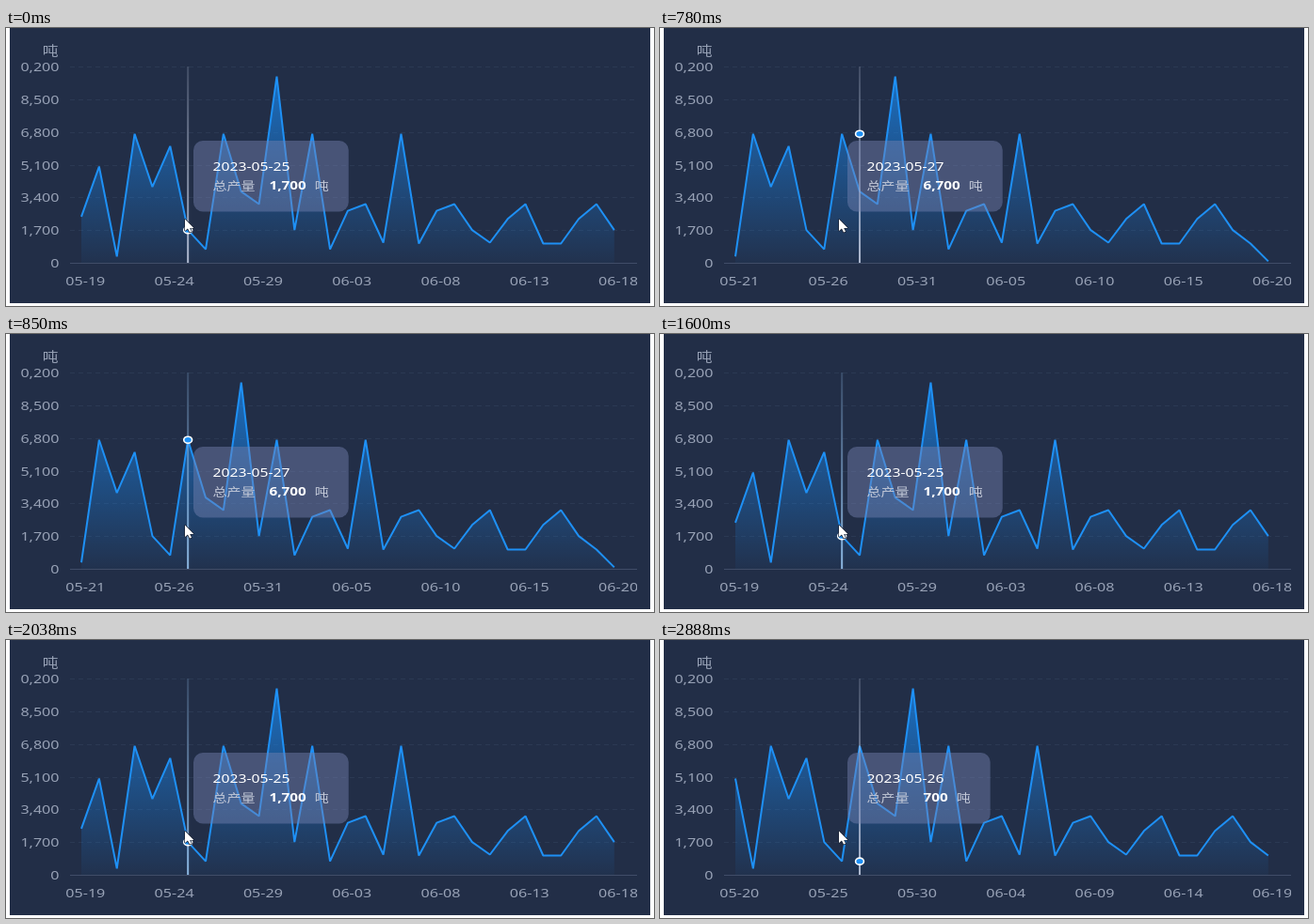
An HTML page with a canvas that plays this animation: 688x296 px, repeating every 3260 ms.

```html
<!DOCTYPE html>
<html lang="zh">
<head>
<meta charset="utf-8">
<title>总产量</title>
<style>
html, body { margin: 0; width: 100%; height: 100%; overflow: hidden; background: #fff; }
canvas { display: block; }
</style>
</head>
<body>
<canvas id="stage" width="688" height="296"></canvas>
<script>
const ctx = document.getElementById('stage').getContext('2d');

const FONT = '"Noto Sans", "Noto Sans CJK SC", "Noto Sans CJK", sans-serif';
const WIDE = 1.22; // the whole picture is wider than tall
const LEFT = 80, STEP = 18.86, BASE = 250, TOP = 41, MAX = 10200, COUNT = 31;
const LABEL = '#98a2b6';
const GREY = '190,200,222', BLUE = '150,196,240';

const data = [
  2400, 5000, 330, 6700, 3950, 6060, 1700, 700, 6700, 3700, 3050,
  9680, 1700, 6700, 700, 2700, 3050, 1050, 6700, 1000, 2700, 3050,
  1700, 1050, 2280, 3050, 1000, 1000, 2280, 3050, 1700, 1000, 80
];

// first day shown, slot of the pointer, day in the tooltip, pointer tone
const LOOP = 3260;
const steps = [
  { at: 0,    first: 0, slot: 6, day: 6, tone: GREY },
  { at: 660,  first: 1, slot: 7, day: 7, tone: GREY },
  { at: 780,  first: 2, slot: 7, day: 8, tone: GREY },
  { at: 850,  first: 2, slot: 6, day: 8, tone: BLUE },
  { at: 1600, first: 0, slot: 6, day: 6, tone: BLUE },
  { at: 2330, first: 1, slot: 7, day: 7, tone: GREY }
];

const px = slot => LEFT + slot * STEP;
const py = value => BASE - value / MAX * (BASE - TOP);
const dateOf = day => new Date(Date.UTC(2023, 4, 19 + day)).toISOString().slice(0, 10);

// Draws text and returns its width on the stage.
function text(str, x, y, { size = 13.2, color = LABEL, align = 'left', weight = 400 } = {}) {
  ctx.save();
  ctx.translate(x, y);
  ctx.scale(WIDE, 1);
  ctx.font = `${weight} ${size}px ${FONT}`;
  ctx.textAlign = align;
  ctx.fillStyle = color;
  ctx.fillText(str, 0, 0);
  const width = ctx.measureText(str).width * WIDE;
  ctx.restore();
  return width;
}

function fade(y0, y1, from, to) {
  const g = ctx.createLinearGradient(0, y0, 0, y1);
  g.addColorStop(0, from);
  g.addColorStop(1, to);
  return g;
}

function rule(y, color, dash) {
  ctx.setLineDash(dash);
  ctx.strokeStyle = color;
  ctx.lineWidth = 1;
  ctx.beginPath();
  ctx.moveTo(68, y);
  ctx.lineTo(670, y);
  ctx.stroke();
  ctx.setLineDash([]);
}

function drawAxes(first) {
  text('吨', 55.5, 29, { size: 13.8, align: 'right' });
  for (let v = 0; v <= MAX; v += 1700) {
    const y = Math.round(py(v));
    const name = v === MAX ? '0,200' : v.toLocaleString('en-US');
    text(name, 56.5, y + 4.5, { align: 'right' });
    if (v) rule(y + 0.5, '#2b3953', [5, 4]);
  }
  rule(BASE + 0.5, '#404d68', []);

  ctx.save();
  ctx.beginPath();
  ctx.rect(0, 255, 670, 35);
  ctx.clip();
  for (let i = 0; i < COUNT; i += 5) {
    text(dateOf(first + i).slice(5), px(i) + 4.3, 274, { align: 'center' });
  }
  ctx.restore();
}

function drawSeries(first) {
  const line = new Path2D();
  for (let i = 0; i < COUNT; i++) line.lineTo(px(i), py(data[first + i]));
  const area = new Path2D(line);
  area.lineTo(px(COUNT - 1), BASE);
  area.lineTo(px(0), BASE);
  area.closePath();
  ctx.fillStyle = fade(52, BASE, 'rgba(24,144,255,.66)', 'rgba(24,144,255,.04)');
  ctx.fill(area);
  ctx.strokeStyle = '#1e90f5';
  ctx.lineWidth = 2;
  ctx.lineJoin = 'bevel';
  ctx.stroke(line);
}

function drawPointer(x, y, tone) {
  ctx.fillStyle = fade(TOP, BASE, `rgba(${tone},.2)`, `rgba(${tone},.9)`);
  ctx.fillRect(x - 1, TOP, 2, BASE - TOP);
  ctx.beginPath();
  ctx.ellipse(x, y, 4.4, 3.5, 0, 0, 2 * Math.PI);
  ctx.fillStyle = '#1e90f5';
  ctx.fill();
  ctx.strokeStyle = '#fff';
  ctx.lineWidth = 1.6;
  ctx.stroke();
}

function drawTooltip(day) {
  const value = data[day].toLocaleString('en-US');
  ctx.font = `600 12.5px ${FONT}`;
  const unitX = 280 + ctx.measureText(value).width * WIDE + 8.5;
  ctx.beginPath();
  ctx.roundRect(199, 120, unitX + 36 - 199, 75.5, 10);
  ctx.fillStyle = 'rgba(118,132,178,.45)';
  ctx.fill();
  text(dateOf(day), 219.5, 152, { size: 12.9, color: '#fff', weight: 500 });
  text('总产量', 219.5, 172.5, { size: 12.3, color: '#c3c9d8' });
  text(value, 279.5, 172, { size: 12.5, color: '#fff', weight: 600 });
  text('吨', unitX, 172.5, { size: 12.3, color: '#c3c9d8' });
}

function drawCursor() {
  const arrow = new Path2D('M190 203.5V216L193 213.6 195 217.6 197 216.8 195.2 212.9H199.3Z');
  ctx.strokeStyle = '#1a2233';
  ctx.lineWidth = 1.4;
  ctx.stroke(arrow);
  ctx.fillStyle = '#fff';
  ctx.fill(arrow);
}

function draw({ first, slot, day, tone }) {
  ctx.fillStyle = '#fff';
  ctx.fillRect(0, 0, 688, 296);
  ctx.fillStyle = '#222e47';
  ctx.fillRect(4, 0, 680, 293);
  drawAxes(first);
  drawSeries(first);
  drawPointer(px(slot), py(data[day]), tone);
  drawTooltip(day);
  drawCursor();
}

const start = performance.now();
let shown;
function tick() {
  const t = (performance.now() - start) % LOOP;
  const step = steps.findLast(s => s.at <= t);
  if (step !== shown) draw(shown = step);
  requestAnimationFrame(tick);
}
tick();
</script>
</body>
</html>
```
